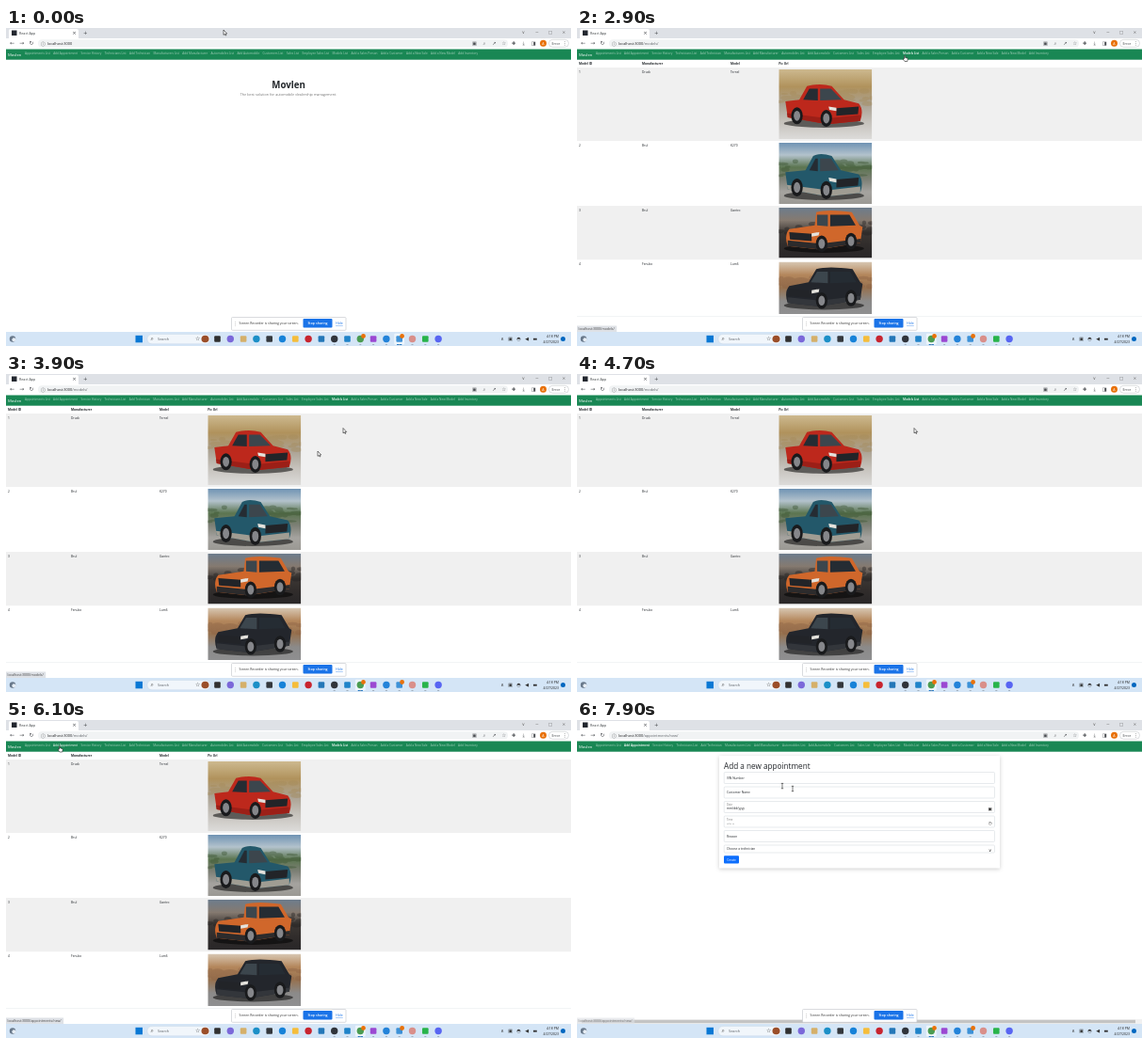
Write an HTML page that moves like this. It is 600 px wide and 338 px high and loops after 8 s.

```html
<!DOCTYPE html>
<html lang="en">
<head>
<meta charset="utf-8">
<title>Dealership demo</title>
<style>
html, body { margin: 0; width: 100%; height: 100%; overflow: hidden; background: #fff; }
svg { display: block; width: 100vw; height: 100vh; font-family: "Open Sans", "Noto Sans", sans-serif; }
.nav { display: flex; justify-content: space-between; font-size: 3.17px; line-height: 11px; white-space: nowrap; color: #fff9; }
.nav .lit { color: #fff; }
.nav .current { color: #fff; font-weight: 600; }
.glyph { font-family: "DejaVu Sans", sans-serif; text-anchor: middle; }
</style>
</head>
<body>
<svg id="stage" viewBox="0 0 600 338" preserveAspectRatio="none"></svg>
<script>
const stage = document.getElementById('stage');
const rect = (x, y, w, h, fill, more = '') =>
  `<rect x="${x}" y="${y}" width="${w}" height="${h}" fill="${fill}" ${more}/>`;
const oval = (x, y, rx, ry, fill) => `<ellipse cx="${x}" cy="${y}" rx="${rx}" ry="${ry}" fill="${fill}"/>`;
const disc = (x, y, r, fill) => oval(x, y, r, r, fill);
const path = (d, fill, more = '') => `<path d="${d}" fill="${fill}" ${more}/>`;
const text = (x, y, size, str, fill = '#212529', more = '') =>
  `<text x="${x}" y="${y}" font-size="${size}" fill="${fill}" ${more}>${str}</text>`;
const group = (id, body) => `<g id="${id}">${body}</g>`;
const middle = 'text-anchor="middle"', bold = 'font-weight="700"';
// A row of symbols at an even pitch.
const glyphs = (x, y, pitch, size, symbols, fill = '#4a4d51') =>
  [...symbols].map((s, i) => text(x + i * pitch, y, size, s, fill, 'class="glyph"')).join('');

function seeded(seed) {
  return () => (seed = seed * 16807 % 2147483647) / 2147483647;
}

const brand = 'Movlen';
const links = ['Appointments List', 'Add Appointment', 'Service History', 'Technicians List', 'Add Technician',
  'Manufacturers List', 'Add Manufacturer', 'Automobiles List', 'Add Automobile', 'Customers List', 'Sales List',
  'Employee Sales List', 'Models List', 'Add a Sales Person', 'Add a Customer', 'Add a New Sale', 'Add a New Model',
  'Add Inventory'];

const browser = () =>
  rect(0, 0, 600, 11, '#dee1e6') + rect(3, 1, 74, 12, '#fff', 'rx="2"') + rect(0, 11, 600, 11.5, '#fff') +
  rect(6, 2.5, 5.5, 5.5, '#23272f') + text(14, 6.9, 3.7, 'React App', '#3c4043') +
  glyphs(72.6, 7, 11.6, 5.5, '×+') + glyphs(549.5, 6.3, 14.3, 4.5, '∨−□×', '#666') +
  rect(34, 12.3, 499, 8.2, '#f1f3f4', 'rx="4.1"') + glyphs(6.5, 18.3, 10.3, 6, '←→↻') + glyphs(39.4, 18, 0, 4.6, 'ⓘ') +
  text(44, 17.9, 3.9, 'localhost:3000<tspan id="path" fill="#5f6368"></tspan>', '#202124') +
  glyphs(497.5, 18.3, 10.45, 5.2, '▣⌕↗☆✚⤓◨') +
  disc(570.5, 16.3, 3.5, '#e8710a') + text(570.5, 17.6, 3.6, 'A', '#fff', middle) +
  rect(576.5, 12.3, 21, 8, '#fff', 'rx="4" stroke="#b9bcc0" stroke-width=".5"') +
  text(579.5, 17.7, 3.7, 'Error', '#3c4043') + glyphs(593.3, 18.2, 0, 5.5, '⋮') +
  rect(0, 22.5, 600, 11.2, '#198754') + text(2, 29.7, 4.2, brand, '#fff') +
  `<foreignObject x="20" y="22.4" width="481" height="11"><div class="nav">${
    links.map(label => `<span>${label}</span>`).join('')}</div></foreignObject>`;

function taskbar() {
  const colors = ['#303030', '#7b68d9', '#d5b06a', '#1b8fc7', '#34383d', '#1782d8', '#f5bd3b', '#c8242f', '#2477b8',
    '#30343b', '#1f83c9', '#4b9c52', '#9b48d2', '#2383d9', '#3d91d7', '#d98f8a', '#28b44b', '#5865f2'];
  const icons = colors.map((color, i) => {
    const x = 224.5 + i * 13.8;
    return (i % 2 ? disc(x, 330.5, 3.7, color) : rect(x - 3.3, 327.2, 6.6, 6.6, color, 'rx="1"')) +
      (i > 8 ? rect(x - 1, 336, 2, .7, '#8b97a4') : '');
  }).join('');
  return rect(0, 323, 600, 15, '#d4e5f6') + disc(7, 330.5, 3.2, '#68788a') + disc(8.4, 331.2, 2, '#e7eef5') +
    rect(137.5, 326.8, 7.5, 7.5, '#0878d4') +
    rect(150, 325.4, 67, 10.4, '#f1f6fb', 'rx="5" stroke="#c3d2e2" stroke-width=".4"') +
    glyphs(155.3, 332.4, 48.5, 6, '⌕☆', '#333') + text(161, 332, 3.9, 'Search', '#5c6167') + oval(211.5, 330.5, 4, 3.8, '#9b4e29') +
    group('active', rect(-5.4, 324.8, 10.8, 11.6, '#edf5fc', 'rx="1"') + rect(-2.6, 336, 5.2, .9, '#0067c0')) + icons +
    disc(379.5, 327.5, 2.4, '#e8710a') + disc(420.6, 327.5, 2.4, '#e8710a') +
    glyphs(527, 332.3, 8.7, 5, '∧▣◓◀▬', '#333') +
    ['4:18 PM', '4/27/2023'].map((s, i) => text(587, 329.2 + 5.4 * i, 3.5, s, '#222', 'text-anchor="end"')).join('') +
    disc(591.5, 330.5, 2.5, '#0067c0');
}

const sharingBar = () =>
  rect(239.5, 307.5, 121.5, 13.8, '#fff', 'rx="1" stroke="#c9ccd0" stroke-width=".7"') +
  glyphs(243.5, 315.5, 0, 5, '⋮', '#777') + text(247.5, 315.2, 3.45, 'Screen Recorder is sharing your screen.', '#333') +
  rect(315.5, 309, 31, 9.5, '#1a73e8', 'rx="1"') + text(331, 315.1, 3.5, 'Stop sharing', '#fff', `${middle} font-weight="600"`) +
  text(350, 315.2, 3.6, 'Hide', '#1a73e8', 'text-decoration="underline"');

// Scenery fades through the given colours; seeded blobs roughen its middle.
function scenery(id, height, colors, blob) {
  const random = seeded(id * 977 + 5);
  const stops = colors.map((c, i) => `<stop offset="${i / (colors.length - 1)}" stop-color="${c}"/>`).join('');
  const blobs = Array.from({ length: 45 }, () =>
    oval(random() * 99, height * (.3 + random() * .25), 2 + random() * 5, 1 + random() * 2, blob)).join('');
  return `<linearGradient id="sky${id}" x2="0" y2="1">${stops}</linearGradient>` +
    rect(0, 0, 99, height, `url(#sky${id})`) + `<g opacity=".4">${blobs}</g>`;
}

// A car in a unit box, seen from its front right corner.
function car({ paint, trim, roof, nose }) {
  const wheel = (x, y) => oval(x, y, .075, .2, '#191a1c') + oval(x, y, .042, .12, '#85868a');
  return oval(.5, .92, .52, .1, '#0008') +
    path(`M0 .4L${roof} .36L${roof + .1} .04Q.45-.04 .6 .04L${nose} .36L.95 .45Q1.02 .6 .97 .86L.55 .94L.03 .78Z`, paint) +
    path(`M${roof + .05} .36L${roof + .13} .1H.42V.38Z`, '#252c33') +
    path(`M.45 .38V.1H.59L${nose - .03} .36Z`, '#3c464d') +
    path('M.02 .68L.55 .8L.97 .72V.86L.55 .94L.03 .78Z', trim) +
    path('M.66 .56L.95 .52L.94 .7L.66 .74Z', '#222428') +
    path('M.56 .52L.66 .55V.63L.57 .6Z', '#e4e2dc') + wheel(.15, .74) + wheel(.53, .8);
}

const stock = [
  { maker: 'Drusk', model: 'Ternel', height: 74, top: 16, bottom: 61, paint: '#bd281c', trim: '#9c1f17', roof: .18, nose: .76,
    blob: '#a58a58', colors: ['#cdb98f', '#b0925c', '#aaa191', '#c5c1bb', '#dcdbd9'] },
  { maker: 'Brul', model: 'K270', height: 65, top: 12, bottom: 60, paint: '#23586a', trim: '#a09d93', roof: .26, nose: .72,
    blob: '#38522f', colors: ['#6f93b3', '#b3c2cc', '#5b7550', '#7d8076', '#a5a39f', '#9b9994'] },
  { maker: 'Brul', model: 'Gantro', height: 53.5, top: 3, bottom: 47, paint: '#d0672b', trim: '#2c2b2c', roof: .04, nose: .62, left: true,
    blob: '#211f20', colors: ['#6d7c8c', '#857a70', '#3b3633', '#302c2b', '#282627'] },
  { maker: 'Fenuko', model: 'Lum6', height: 55.5, top: 6, bottom: 50, paint: '#23262c', trim: '#33363b', roof: .03, nose: .7, left: true,
    blob: '#8c6145', colors: ['#d8c8b4', '#b4875c', '#96714f', '#8b8a89', '#8f8f90'] }
];

function modelsPage() {
  const columns = [2, 69, 163, 214.3];
  const header = ['Model ID', 'Manufacturer', 'Model', 'Pic Url'];
  let y = 42;
  return header.map((s, i) => text(columns[i], 39.4, 3.2, s, '#212529', bold)).join('') +
    stock.map((item, i) => {
      const { height, top, bottom, left } = item;
      const pose = `translate(${left ? 89 : 7} ${top}) scale(${left ? -82 : 82} ${bottom - top})`;
      const row = rect(0, y, 600, height + 4, i % 2 ? '#fff' : '#f0f0f0') +
        [i + 1, item.maker, item.model].map((s, c) => text(columns[c], y + 5.7, 3.25, s)).join('') +
        `<svg x="${columns[3]}" y="${y + 2}" width="99" height="${height}">${
          scenery(i, height, item.colors, item.blob)}<g transform="${pose}">${car(item)}</g></svg>`;
      y += height + 4;
      return row;
    }).join('') + rect(0, y, 600, .4, '#dee2e6');
}

function formPage() {
  const fields = [['VIN Number'], ['Customer Name'], ['mm/dd/yyyy', 'Date', '▣'], ['--:-- --', 'Time', '◷'], ['Reason'],
    ['Choose a technician', '', '∨']];
  return rect(151, 38, 298, 119.5, '#fff', 'style="filter:drop-shadow(0 1.5px 2px #0003)"') +
    text(156, 52.2, 8.2, 'Add a new appointment', '#212529', 'font-weight="500"') +
    fields.map(([value, label = '', symbol = ''], i) => {
      const y = 55.5 + 15.5 * i, height = i < 5 ? 12 : 8;
      return rect(156.2, y, 287.3, height, '#fff', 'rx="1" stroke="#ced4da" stroke-width=".5"') +
        text(159, y + 4.5, 2.7, label, '#777') + text(159, y + height / 2 + (label ? 2.9 : 1.2), 3.25, value) +
        glyphs(438.7, y + height / 2 + 3, 0, 4.5, symbol, '#222');
    }).join('') +
    rect(156, 144.2, 16, 8.4, '#0d6efd', 'rx="1"') + text(164, 149.6, 3.2, 'Create', '#fff', middle) +
    rect(0, 318, 600, 5, '#f1f1f1') + rect(5, 318.8, 588, 3.4, '#c4c4c4');
}

const homePage = () => text(300, 64, 9.7, brand, '#212529', `${middle} ${bold}`) +
  text(300, 72.4, 3.95, 'The best solution for automobile dealership management.', '#333', `${middle} font-weight="300"`);

const ink = 'stroke="#111" stroke-width=".55"';
const pointers = {
  arrow: path('M0 0V5.4L1.2 4.3 2.1 6 2.9 5.7 2.1 4H3.7Z', '#fff', ink),
  hand: path('M-.5 .5Q0-.3.6.5V2.5L3 3Q3.6 3.2 2.8 6.5H0L-1.9 4-.5 3.6Z', '#fff', ink),
  beam: path('M-1.2-2.7h2.4M0-2.7v5.4M-1.2 2.7h2.4', 'none', ink)
};

stage.innerHTML = rect(0, 0, 600, 338, '#fff') + browser() +
  group('home', homePage()) + group('models', modelsPage()) + group('form', formPage()) +
  group('status', rect(0, 316.5, 1, 6.5, '#dee1e6', 'id="bubble"') + text(1.5, 321, 3.5, '', '#444', 'id="hint"')) +
  sharingBar() + taskbar() + group('trail', '') + group('cursor', '');

const $ = id => document.getElementById(id);
const show = (id, on) => $(id).style.display = on ? '' : 'none';
const place = (id, x, y) => $(id).setAttribute('transform', `translate(${x} ${y})`);

// Each move eases out from wherever the pointer is: start, end, x, y.
const moves = [
  [300, 1100, 228, 4], [1600, 1700, 174, 11], [1700, 2600, 348, 29], [3400, 3700, 331, 82],
  [3700, 3900, 358, 57.5], [4900, 5700, 57, 27.5], [7400, 7900, 229, 73]
];
function pointerAt(t) {
  return moves.reduce(([x, y], [start, end, toX, toY]) => {
    const u = Math.min(1, Math.max(0, (t - start) / (end - start))), k = 1 - (1 - u) ** 3;
    return [x + (toX - x) * k, y + (toY - y) * k];
  }, [231, 2]);
}

const pages = {
  home: { path: '', link: '' },
  models: { path: '/models/', link: 'Models List' },
  form: { path: '/appointments/new/', link: 'Add Appointment' }
};
const linkNodes = [...document.querySelectorAll('.nav span')];

function draw(t) {
  const name = t < 2800 ? 'home' : t < 7400 ? 'models' : 'form';
  const pointed = t < 5000 ? pages.models : pages.form;
  const hovering = t >= 2600 && t < 3400 || t >= 5700 && t < 7400;
  Object.keys(pages).forEach(id => show(id, id === name));
  $('path').textContent = pages[name].path;
  linkNodes.forEach(node => {
    const label = node.textContent;
    node.className = label === pages[name].link ? 'current' : hovering && label === pointed.link ? 'lit' : '';
  });

  show('status', t >= 2600 && t < 4000 || t >= 5800);
  $('status').setAttribute('opacity', t >= 7800 ? .6 : 1);
  $('hint').textContent = 'localhost:3000' + pointed.path;
  $('bubble').setAttribute('width', $('hint').getComputedTextLength() + 4);
  place('active', t < 2600 ? 417.7 : 376.3, 0);

  const now = pointerAt(t), before = pointerAt(t - 200);
  const kind = hovering ? 'hand' : name === 'form' && now[1] > 55 ? 'beam' : 'arrow';
  $('cursor').innerHTML = pointers[kind];
  place('cursor', ...now);

  // The screen capture leaves a stale pointer behind while it moves over the page.
  show('trail', before[1] > 40 && before[0] !== now[0]);
  $('trail').innerHTML = pointers[kind];
  place('trail', ...before);
}

const start = performance.now();
function tick() {
  const t = (performance.now() - start) % 8000;
  draw(Math.floor(t / 100) * 100);
  requestAnimationFrame(tick);
}
tick();
</script>
</body>
</html>
```
